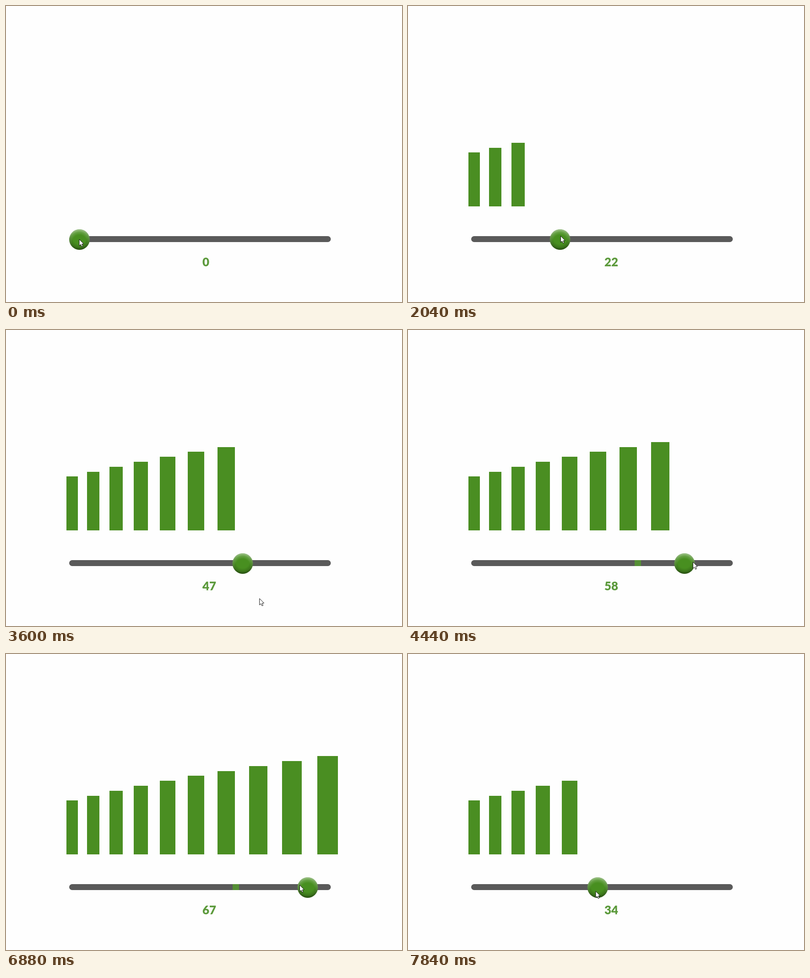
An HTML page with a canvas that plays this animation: 865x647 px, repeating every 8000 ms.

```html
<!DOCTYPE html>
<html lang="en">
<head>
<meta charset="utf-8">
<title>Slider</title>
<style>
html, body { margin: 0; width: 100%; height: 100%; overflow: hidden; background: #fefefe; }
canvas { display: block; }
</style>
</head>
<body>
<canvas id="stage" width="865" height="647"></canvas>
<script>
const ctx = document.getElementById('stage').getContext('2d');
const LOOP = 8000, STEP = 40, LAG = 30;
const GREEN = '#4a8e22';
const LEFT = 160.5, RIGHT = 687, MAX = 70, MID = 510.5;
const PARKED = 517;

// time, knob centre
const knobPath = [
  [840, LEFT], [1200, 216], [1440, 227.3], [2520, 455], [2600, 479.5], [2760, PARKED],
  [4160, PARKED], [4440, 604], [4760, RIGHT], [6680, RIGHT], [6880, 659], [7520, 476], [7840, 414.3]
];
// time, pointer x relative to the knob, pointer y
const pointerPath = [
  [840, -.5, 510], [1440, 4.5, 501], [2600, -1.7, 507], [3080, 57, 575], [3400, 49, 603],
  [4120, 4, 512], [4440, 18.5, 507], [4960, 16, 511], [5240, 16, 511], [5480, 33, 614],
  [5640, 33, 614], [5880, 3, 574.5], [6360, -12, 509], [6880, -17.5, 505], [7840, -4.3, 518.5]
];

function slope(path, i, k) {
  const a = path[i], b = path[i + 1];
  return a && b ? (b[k] - a[k]) / (b[0] - a[0]) : 0;
}

function tangent(path, i, k) {
  const p = slope(path, i - 1, k), q = slope(path, i, k);
  return p * q > 0 ? 2 * p * q / (p + q) : 0;
}

// Monotone cubic through the keys
function follow(path, t, k = 1) {
  if (t <= path[0][0]) return path[0][k];
  const i = path.findIndex(p => p[0] > t) - 1;
  if (i < 0) return path[path.length - 1][k];
  const a = path[i], b = path[i + 1], h = b[0] - a[0], u = (t - a[0]) / h;
  const u2 = u * u, u3 = u2 * u;
  return a[k] * (2 * u3 - 3 * u2 + 1) + b[k] * (3 * u2 - 2 * u3) +
    h * (tangent(path, i, k) * (u3 - 2 * u2 + u) + tangent(path, i + 1, k) * (u3 - u2));
}

function drawBars(count) {
  ctx.fillStyle = GREEN;
  for (let i = 0; i < count; i++) {
    const x = 132 + 43.1 * i + 1.976 * i * i;
    const left = Math.round(x), right = Math.round(x + 24.6 + 2.27 * i);
    const top = Math.round(320.3 - 10.8 * i);
    ctx.fillRect(left, top, right - left, 438 - top);
  }
}

function drawTrack(t, x) {
  ctx.save();
  ctx.beginPath();
  ctx.roundRect(138, 503, 571.5, 13, 6.5);
  ctx.fillStyle = '#5a5a5a';
  ctx.fill();
  ctx.clip();
  // Green left behind where the knob rested
  if (t > 4200 && x > PARKED + 14) {
    ctx.fillStyle = '#568f36';
    ctx.fillRect(PARKED - 22, 503, 14, 13);
  }
  ctx.restore();
}

function shade(x, y, from, to, color) {
  const g = ctx.createRadialGradient(x, y, from, x, y, to);
  g.addColorStop(0, `rgba(${color},0)`);
  g.addColorStop(.5, `rgba(${color},.16)`);
  g.addColorStop(1, `rgba(${color},.5)`);
  ctx.fillStyle = g;
  ctx.fill();
}

function drawKnob(x) {
  ctx.beginPath();
  ctx.arc(x, MID, 22.4, 0, Math.PI * 2);
  ctx.fillStyle = '#488f20';
  ctx.fill();
  shade(x, MID - 5, 15, 28, '0,0,0');
  shade(x, MID + 6, 16, 28.5, '255,255,255');
}

function drawValue(value) {
  ctx.fillStyle = '#5c9a3c';
  ctx.font = '900 26px Lato, "Open Sans", sans-serif';
  ctx.fillText(value, 429, 569);
}

function drawPointer(x, y) {
  ctx.beginPath();
  [[0, 0], [0, 14], [3.2, 11.2], [5.4, 16], [7.8, 15], [5.7, 10.4], [9.8, 10]]
    .forEach(([dx, dy]) => ctx.lineTo(x + dx, y + dy));
  ctx.closePath();
  ctx.fillStyle = '#fff';
  ctx.fill();
  ctx.lineWidth = 1;
  ctx.strokeStyle = '#111';
  ctx.stroke();
}

function draw(t) {
  const x = follow(knobPath, t);
  // The number trails the knob slightly
  const value = Math.round((follow(knobPath, t - LAG) - LEFT) / (RIGHT - LEFT) * MAX);
  ctx.fillStyle = '#fefefe';
  ctx.fillRect(0, 0, 865, 647);
  drawBars(Math.round(value / 7));
  drawTrack(t, x);
  drawKnob(x);
  drawValue(value);
  drawPointer(x + follow(pointerPath, t), follow(pointerPath, t, 2));
}

const start = performance.now();
function tick() {
  const t = (performance.now() - start) % LOOP;
  draw(Math.floor(t / STEP) * STEP);
  requestAnimationFrame(tick);
}
tick();
</script>
</body>
</html>
```
